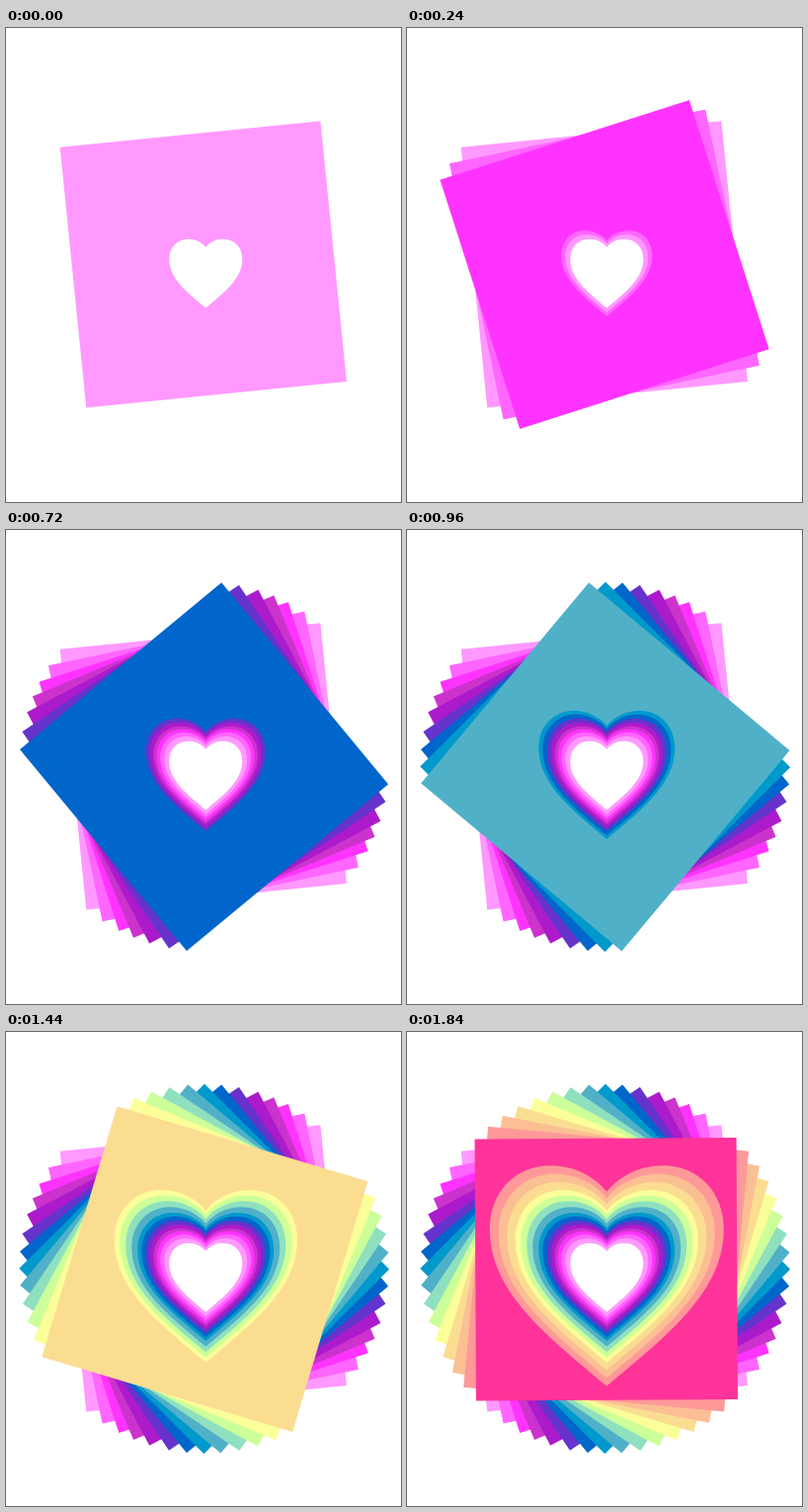
Animation of 400x480 px, one loop 2680 ms. Source, as an HTML page with a canvas:

```html
<!DOCTYPE html>
<html lang="en">
<head>
<meta charset="utf-8">
<title>Rainbow heart spiral</title>
<style>
html, body { margin: 0; height: 100%; overflow: hidden; background: #fff; }
canvas { display: block; }
</style>
</head>
<body>
<canvas id="stage" width="400" height="480"></canvas>
<script>
const ctx = document.getElementById('stage').getContext('2d');
const LOOP = 2680, STEP = 120, HALF_SIDE = 132.5;

// One sheet per step: colour, counter-clockwise turn in degrees, half width of its heart hole
const sheets = [
  ['#ff99ff', 5.75, 37], ['#ff66ff', 11.9, 42], ['#ff33ff', 17.75, 46], ['#cc33cc', 22.7, 49.5],
  ['#ac1bcb', 27.9, 52.7], ['#6633cc', 34.1, 56.5], ['#0066cc', 39.6, 60.5], ['#0099cc', 44.9, 65],
  ['#50b0c8', 50.1, 69], ['#8fe0bf', 55.9, 75], ['#ccff99', 61.7, 81], ['#fbff99', 67.5, 87],
  ['#fbdd92', 73.3, 92.7], ['#fbbf94', 78.9, 101], ['#ff9999', 84.6, 109.5], ['#ff3399', 90.3, 118.5]
].map(([color, turn, heart]) => ({ color, turn, heart }));

const heartPath = new Path2D(
  'M0-.74C-.1-.87-.28-.965-.48-.965C-.78-.965-1-.74-1-.42C-1 .12-.5 .5 0 .92' +
  'C.5 .5 1 .12 1-.42C1-.74 .78-.965 .48-.965C.28-.965 .1-.87 0-.74Z');

function drawSquare({ color, turn }, i) {
  ctx.save();
  ctx.translate(199.8 + i * 0.13, 239.4 + i * 0.06);
  ctx.rotate(-turn * Math.PI / 180);
  ctx.fillStyle = color;
  ctx.fillRect(-HALF_SIDE, -HALF_SIDE, 2 * HALF_SIDE, 2 * HALF_SIDE);
  ctx.restore();
}

function drawHeart(size, color) {
  ctx.save();
  ctx.translate(202.3, 249.5);
  ctx.scale(size, size);
  ctx.fillStyle = color;
  ctx.fill(heartPath);
  ctx.restore();
}

function draw(time) {
  const count = Math.min(sheets.length, Math.floor(time / STEP) + 1);
  ctx.fillStyle = '#fff';
  ctx.fillRect(0, 0, 400, 480);
  sheets.slice(0, count).forEach(drawSquare);
  // Each hole shows the sheet beneath it
  for (let i = count - 1; i >= 0; i--) {
    drawHeart(sheets[i].heart, i ? sheets[i - 1].color : '#fff');
  }
}

const start = performance.now();
function tick() {
  draw((performance.now() - start) % LOOP);
  requestAnimationFrame(tick);
}
tick();
</script>
</body>
</html>
```
